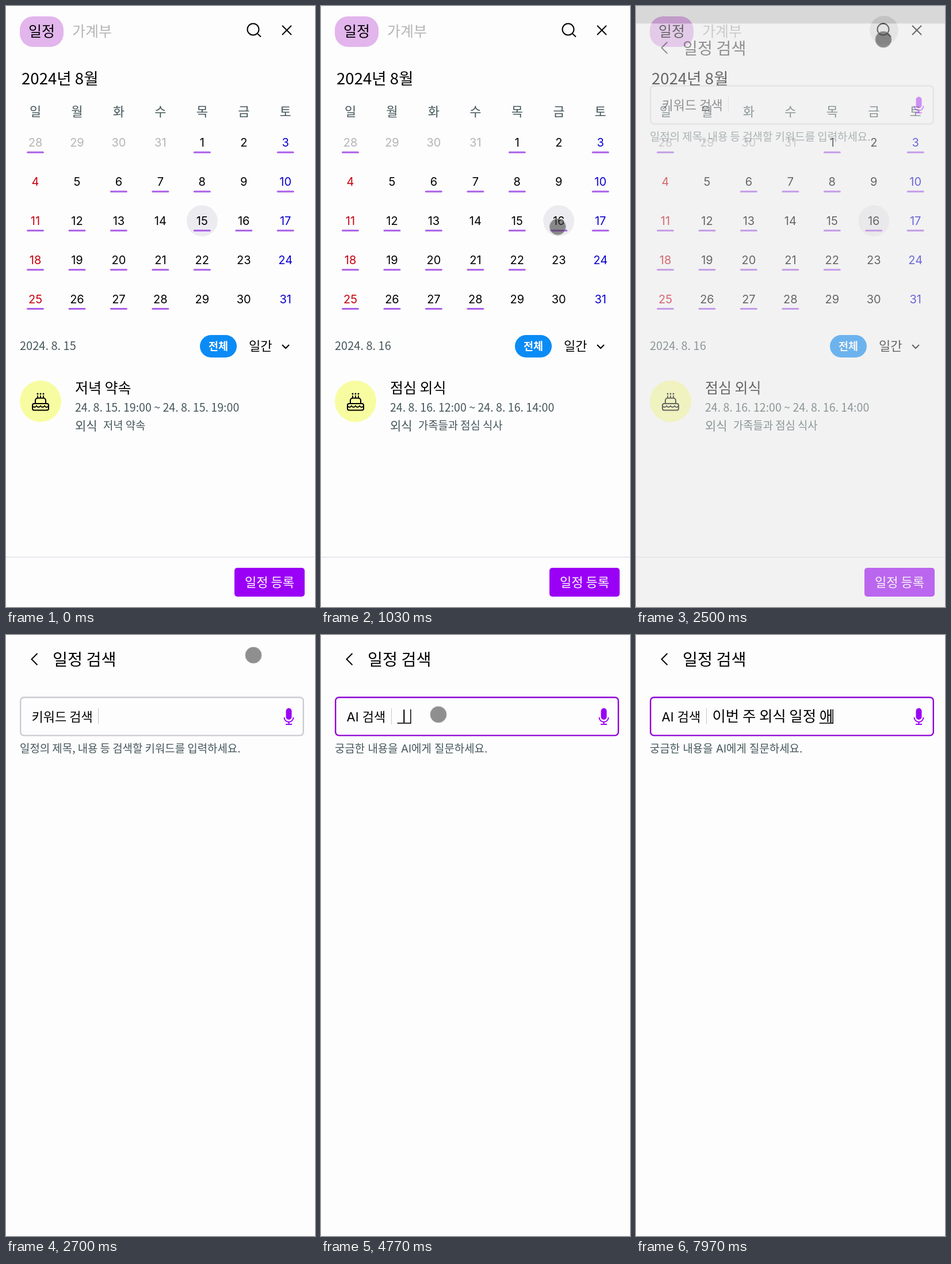
Recreate the animation shown at these times as an HTML page with a canvas. Size 537x1043 px, loop 8 s.

```html
<!DOCTYPE html>
<html lang="ko">
<head>
<meta charset="utf-8">
<style>
  html, body { margin: 0; width: 100%; height: 100%; overflow: hidden; background: #fdfdfd; }
  canvas { display: block; width: 537px; height: 1043px; }
</style>
</head>
<body>
<canvas id="stage"></canvas>
<script>
const W = 537, H = 1043, LOOP = 8000;
const KR = '"Noto Sans CJK KR", "Noto Sans CJK", sans-serif';
const LATIN = `Inter, ${KR}`;
const INK = '#000', SLATE = '#44565a', PALE = '#b5b5b5', BG = '#fdfdfd';
const PURPLE = '#9a00f5', BAR = '#a95ee8';

const canvas = document.getElementById('stage');
const c = canvas.getContext('2d');
const ratio = window.devicePixelRatio || 1;
canvas.width = W * ratio;
canvas.height = H * ratio;

const clamp = v => Math.max(0, Math.min(1, v));
const span = (t, from, to) => clamp((t - from) / (to - from));
const easeOut = u => 1 - (1 - u) ** 3;
const smooth = u => u * u * (3 - 2 * u);

// y is the vertical middle of the glyphs
function text(s, x, y, size, color = INK, { align = 'left', weight = 400, family = KR } = {}) {
  c.font = `${weight} ${size}px ${family}`;
  c.textAlign = align;
  c.fillStyle = color;
  c.fillText(s, x, y + size * 0.37);
}

function box(x, y, w, h, r, color) {
  c.beginPath();
  c.roundRect(x, y, w, h, r);
  c.fillStyle = color;
  c.fill();
}

function disc(x, y, r, color) {
  c.beginPath();
  c.arc(x, y, r, 0, Math.PI * 2);
  c.fillStyle = color;
  c.fill();
}

function stroke(width, color) {
  c.lineWidth = width;
  c.strokeStyle = color;
  c.stroke();
}

function line(points, width = 2, color = INK) {
  c.beginPath();
  points.forEach(([x, y]) => c.lineTo(x, y));
  stroke(width, color);
}

function faded(alpha, dx, dy, draw) {
  if (alpha <= 0) return;
  c.save();
  c.globalAlpha *= alpha;
  c.translate(dx, dy);
  draw();
  c.restore();
}

// Calendar page

const colX = i => 51 + 72.45 * i;
const rowY = i => 237 + 67.9 * i;
const marked = ['046', '2346', '012456', '01234', '0123'];

function header(t) {
  box(24, 18, 76, 53, 23, '#e2b5ec');
  text('일정', 62, 44, 25, INK, { align: 'center' });
  text('가계부', 115, 44, 25, PALE);

  const press = span(t, 2330, 2450);
  if (press) disc(431, 42, 25 * (0.6 + 0.4 * press), `rgba(0,0,0,${0.1 * press})`);
  c.beginPath();
  c.arc(429.5, 40.5, 10, 0, Math.PI * 2);
  stroke(2, INK);
  line([[436.5, 47.5], [443, 53.5]]);
  line([[480, 34], [496, 50]]);
  line([[496, 34], [480, 50]]);
}

function calendar(t) {
  text('2024년 8월', 27, 126, 27.6);
  [...'일월화수목금토'].forEach((d, i) => text(d, colX(i), 183, 22, SLATE, { align: 'center' }));

  const swap = span(t, 690, 830);
  const y = rowY(2);
  if (swap < 1) disc(colX(4), y, 27 - 10 * swap, `rgba(236,236,240,${1 - swap})`);
  if (swap > 0.3) disc(colX(5), y, 17 + 10 * swap, `rgba(236,236,240,${swap})`);

  for (let n = 0; n < 35; n++) {
    const col = n % 7, row = Math.floor(n / 7), before = n < 4;
    const day = before ? 28 + n : n - 3;
    const color = before ? PALE : col === 0 ? '#c8000f' : col === 6 ? '#0a00d0' : INK;
    text(day, colX(col), rowY(row), 20, color, { align: 'center', family: LATIN });
    if (marked[row].includes(col)) box(colX(col) - 15, rowY(row) + 15.5, 30, 3, 1.5, BAR);
  }
}

function cake() {
  disc(60, 686, 36, '#f8fca0');
  for (const x of [55, 60, 65]) {
    disc(x, 673, 1.5, INK);
    line([[x, 676], [x, 680]], 1.8);
  }
  c.beginPath();
  c.roundRect(51, 680.5, 18, 9.5, [4, 4, 0, 0]);
  c.roundRect(46, 690, 28, 11.5, 3);
  c.moveTo(46, 694);
  for (let x = 46; x < 74; x += 7) c.quadraticCurveTo(x + 3.5, 698.5, x + 7, 694);
  stroke(2, INK);
}

function entry(title, times, note) {
  cake();
  text(title, 120, 663, 25);
  text(times, 120, 697, 19.6, SLATE);
  text('외식', 120, 728, 21, SLATE);
  text(note, 169, 728, 18.8, SLATE);
}

function agenda(t) {
  text(`2024. 8. ${t < 600 ? 15 : 16}`, 24, 590, 20, SLATE);
  box(337, 571, 64, 39, 19.5, '#0b8bf5');
  text('전체', 369, 590, 18.5, '#fff', { align: 'center', weight: 700 });
  text('일간', 422, 590, 22);
  line([[480, 588], [486, 594], [492, 588]], 2.2);

  const out = span(t, 560, 680), inn = span(t, 690, 910);
  faded(1 - out, -12 * out, 0, () =>
    entry('저녁 약속', '24. 8. 15. 19:00 ~ 24. 8. 15. 19:00', '저녁 약속'));
  faded(inn, 12 * (1 - smooth(inn)), 0, () =>
    entry('점심 외식', '24. 8. 16. 12:00 ~ 24. 8. 16. 14:00', '가족들과 점심 식사'));
}

function calendarPage(t) {
  box(0, 0, W, H, 0, BG);
  header(t);
  calendar(t);
  agenda(t);
  line([[0, 956.5], [W, 956.5]], 1, '#d4d6e6');
  box(397, 975, 122, 50, 5, PURPLE);
  text('일정 등록', 458, 1000, 22, '#fff', { align: 'center' });
}

// Search page

const typing = [
  [4450, ''], [4700, 'ㅣ'], [5270, ''], [5870, 'ㅇ'], [5930, '이'],
  [6200, '이ㅂ'], [6300, '이버'], [6400, '이번'], [6550, '이번 '],
  [6700, '이번 ㅈ'], [6850, '이번 주'], [7000, '이번 주 '],
  [7070, '이번 주 외'], [7130, '이번 주 외ㅅ'], [7180, '이번 주 외시'], [7230, '이번 주 외식'],
  [7370, '이번 주 외식 '], [7400, '이번 주 외식 ㅇ'], [7430, '이번 주 외식 일'],
  [7570, '이번 주 외식 일ㅈ'], [7630, '이번 주 외식 일저'], [7700, '이번 주 외식 일정'],
  [7770, '이번 주 외식 일정 '], [7830, '이번 주 외식 일정 ㅇ'],
  [7900, '이번 주 외식 일정 아'], [7970, '이번 주 외식 일정 애']
];

function query(t) {
  const step = typing.findLast(([at]) => t >= at);
  if (!step) return;
  const s = step[1], x = 132.5;
  text(s, x, 141, 25.4);
  const end = x + c.measureText(s).width;
  if (s && !s.endsWith(' ')) {
    const start = x + c.measureText(s.slice(0, -1)).width;
    line([[start, 153], [end, 153]], 1.6);
  }
  const blink = t >= 5600 && t < 5870;
  if (!blink) line([[end, 129], [end, 154]], 1.5);
}

function mic() {
  box(486.5, 127, 10, 20, 5, PURPLE);
  c.beginPath();
  c.arc(491.5, 143, 8, 0, Math.PI);
  stroke(2, PURPLE);
  line([[491.5, 151], [491.5, 155]], 2, PURPLE);
  line([[486, 155], [497, 155]], 2, PURPLE);
}

function searchPage(t) {
  const ai = t >= 3850, focus = t >= 4450;
  const family = ai ? LATIN : KR;
  box(0, 0, W, H, 0, BG);
  line([[54.5, 32], [44.5, 42], [54.5, 52]]);
  text('일정 검색', 81, 43, 28.3);

  c.beginPath();
  c.roundRect(25.2, 108.2, 491.6, 66.2, 6);
  stroke(2.4, focus ? '#8f00d6' : '#cbcbd2');

  text(ai ? 'AI 검색' : '키워드 검색', 44.5, 141.5, 22, INK, { family });
  const x = ai ? 122.5 : 160.5;
  line([[x, 127], [x, 155]], 1, '#c6c6ce');
  mic();
  text(ai ? '궁금한 내용을 AI에게 질문하세요.' : '일정의 제목, 내용 등 검색할 키워드를 입력하세요.',
    24, 197, 18.9, SLATE, { family });
  query(t);
}

// Pointer: time, x, y
const path = [
  [400, 411, 385], [1000, 411, 385], [1670, 465, 109], [2150, 430, 58], [2500, 430, 58],
  [2700, 430, 35], [3000, 430, 38], [3650, 100, 142], [4000, 100, 142], [4450, 204, 138]
];

function pointer(t) {
  const alpha = span(t, 400, 460) * (1 - span(t, 5870, 5970));
  if (!alpha) return;
  const i = path.findLastIndex(([at]) => t >= at);
  const a = path[i], b = path[i + 1] || a;
  const u = a === b ? 0 : smooth(span(t, a[0], b[0]));
  faded(alpha, a[1] + (b[1] - a[1]) * u, a[2] + (b[2] - a[2]) * u, () => {
    disc(0, 0, 14, 'rgba(60,60,60,.57)');
    stroke(1, '#a4a4a4');
  });
}

// The rising search page carries a shade above its top edge
const RISE = 83;

function draw(t) {
  c.setTransform(ratio, 0, 0, ratio, 0, 0);
  const slide = easeOut(span(t, 2430, 2680));
  const alpha = span(t, 2430, 2605);
  if (slide < 1) calendarPage(t);
  if (alpha > 0) {
    box(0, 0, W, H, 0, `rgba(0,0,0,${0.07 * span(t, 2430, 2490)})`);
    faded(alpha, 0, RISE * (1 - slide), () => {
      box(0, -RISE, W, RISE, 0, 'rgba(0,0,0,.2)');
      searchPage(t);
    });
  }
  pointer(t);
}

const begin = performance.now();
function frame() {
  draw((performance.now() - begin) % LOOP);
  requestAnimationFrame(frame);
}
frame();
</script>
</body>
</html>
```
